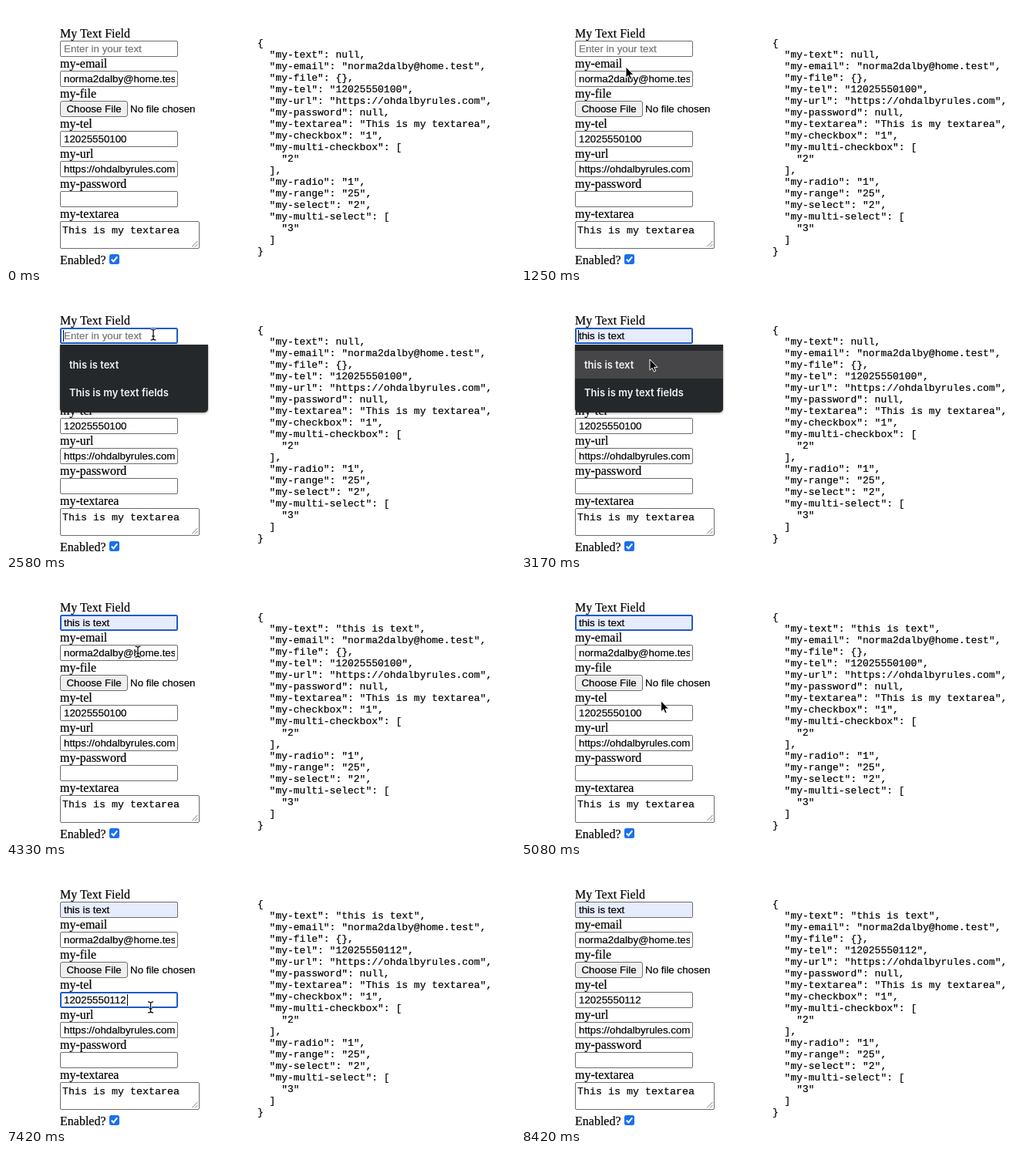
Animation, 660 px wide and 336 px high, one loop 8830 ms. Source, as an HTML page:

```html
<!DOCTYPE html>
<html lang="en">
<head>
<meta charset="utf-8">
<title>Form to JSON</title>
<style>
html, body { margin: 0; width: 100%; height: 100%; overflow: hidden; background: #fff; }
#stage { position: relative; width: 660px; height: 336px; overflow: hidden; color: #000;
  -webkit-text-stroke: .2px; }
#stage > *, .box > * { position: absolute; box-sizing: border-box; white-space: pre; }
.label { left: 70px; font: 16px/18px "Liberation Serif", "Times New Roman", serif; }
.box { left: 70px; width: 153px; height: 21px; background: #fff; border: 1px solid #6c6c6c; border-radius: 2px; }
.box.focus { border-color: #1c5ac8; box-shadow: inset 0 0 0 1px #1c5ac8; }
.box.filled { background: #e6ecfc; }
.value { left: 4px; right: 3px; top: 0; height: 19px; overflow: hidden; }
.value, .ui { font: 13.333px/19px "Liberation Sans", Arial, sans-serif; }
.hint { color: #757575; }
.caret { top: 2px; width: 1px; height: 15px; background: #000; }
#choose { left: 70px; top: 123px; width: 88px; height: 21px; text-align: center;
  background: #efefef; border: 1px solid #6c6c6c; border-radius: 3px; }
#nofile { left: 161px; top: 124px; }
.mono { font-family: "Liberation Mono", "Courier New", monospace; }
#area { top: 279px; width: 181px; height: 36px; }
#area span { left: 2px; top: 4px; font-size: 13.333px; line-height: 15px; }
#area svg { right: 1px; bottom: 1px; }
#json { left: 326px; top: 41px; margin: 0; font-size: 13px; line-height: 15px; }
#check { left: 134px; top: 322px; }
#popup { left: 70px; top: 67px; width: 192px; height: 88px; padding-top: 8px; background: #25282a;
  border-radius: 0 0 5px 5px; box-shadow: 0 1px 3px rgba(0,0,0,.4); -webkit-text-stroke: 0; }
#popup div { height: 36px; padding-left: 12px; color: #f2f2f2;
  font: 600 13px/36px Inter, "Liberation Sans", sans-serif; }
#popup .hover { background: #464648; }
#pointer { left: 0; top: 0; overflow: visible; }
</style>
</head>
<body>
<div id="stage">
  <div class="ui" id="choose">Choose File</div>
  <div class="ui" id="nofile">No file chosen</div>
  <div class="box" id="area"><span class="mono">This is my textarea</span>
    <svg width="8" height="8"><path d="M0 7.5L7.5 0M4 7.5L7.5 4" stroke="#777"/></svg></div>
  <svg id="check" width="13" height="13">
    <rect width="13" height="13" rx="2.5" fill="#1a70ee"/>
    <path d="M2.8 6.8L5.4 9.4L10.2 3.4" fill="none" stroke="#fff" stroke-width="2"/>
  </svg>
  <pre class="mono" id="json"></pre>
  <div id="popup"><div>this is text</div><div>This is my text fields</div></div>
  <svg id="pointer" width="1" height="1">
    <path id="arrow" d="M0 0V14.2L3.2 11.2L5.4 16.2L7.7 15.2L5.6 10.3H10Z" fill="#000" stroke="#fff"/>
    <g id="beam" fill="none">
      <path d="M-3.5 -7Q0 -7 0 -5Q0 -7 3.5 -7M0 -5V5M-3.5 7Q0 7 0 5Q0 7 3.5 7M-2 2H2" stroke="#fff" stroke-width="2.6"/>
      <path d="M-3.5 -7Q0 -7 0 -5Q0 -7 3.5 -7M0 -5V5M-3.5 7Q0 7 0 5Q0 7 3.5 7M-2 2H2" stroke="#000" stroke-width="1.2"/>
    </g>
  </svg>
</div>
<script>
const LOOP = 8830, TICK = 1000 / 12;
const EMAIL = "norma2dalby@home.test", URL_TEXT = "https://ohdalbyrules.com";
const $ = id => document.getElementById(id);
const stage = $("stage"), json = $("json"), popup = $("popup");

// Pointer hot spot: time, x, y
const path = [
  [580, 208, 338], [1250, 136, 79], [1420, 135, 78], [1500, 135, 78], [2170, 191, 54],
  [2750, 191, 54], [3170, 167, 86], [3750, 167, 86], [4330, 171, 93], [4670, 178, 128],
  [5420, 184, 177], [7340, 184, 177], [8000, 268, 295], [8420, 268, 295]
];
// Telephone value after each edit
const edits = [
  [0, "12025550100"], [6420, "1202555010"], [6670, "120255501"],
  [6830, "1202555011"], [7080, "12025550112"]
];
const caretResets = [2500, 3000, 3500, 5500, 6420, 6670, 6830, 7080];

function add(tag, className, parent, text = "") {
  const el = document.createElement(tag);
  el.className = className;
  el.textContent = text;
  parent.prepend(el);
  return el;
}

function label(text, top) {
  add("div", "label", stage, text).style.top = top + "px";
}

function field(top, text = "") {
  const box = add("div", "box", stage);
  box.style.top = top + "px";
  const caret = add("i", "caret", box);
  const value = add("span", "value", box, text);
  caret.style.display = "none";
  return { box, value, caret };
}

["My Text Field", "my-email", "my-file", "my-tel", "my-url", "my-password", "my-textarea"]
  .forEach((name, i) => label(name, 27 + 39 * i));
label("Enabled?", 321);
const text = field(45), tel = field(162);
field(84, EMAIL);
field(201, URL_TEXT);
field(240);

const latest = (list, t) => list.filter(item => item[0] <= t).pop();
const inBox = (x, y, top, h = 21) => x >= 70 && x <= 223 && y >= top && y <= top + h;

function pointerAt(t) {
  const i = Math.max(1, path.findIndex(p => p[0] >= t));
  const [a, b] = [path[i - 1], path[i]];
  const u = (t - a[0]) / (b[0] - a[0]), k = u * u * (3 - 2 * u);
  return [a[1] + (b[1] - a[1]) * k, a[2] + (b[2] - a[2]) * k];
}

function drawPointer(t, popupOpen) {
  const shown = t >= 580 && t < 8420 && !(t >= 6420 && t < 7420);
  $("pointer").style.display = shown ? "" : "none";
  if (!shown) return;
  const [x, y] = pointerAt(t);
  const overPopup = popupOpen && y > 67;
  const beam = !overPopup &&
    ([45, 84, 162, 201, 240].some(top => inBox(x, y, top)) || inBox(x, y, 279, 36));
  $("beam").style.display = beam ? "" : "none";
  $("arrow").style.display = beam ? "none" : "";
  $("pointer").style.transform = `translate(${x}px, ${y}px)`;
}

function drawField(f, focus, caretOn, caretX) {
  f.box.classList.toggle("focus", focus);
  f.caret.style.display = focus && caretOn ? "" : "none";
  f.caret.style.left = caretX + "px";
}

function data(filled, phone) {
  return {
    "my-text": filled ? "this is text" : null,
    "my-email": EMAIL,
    "my-file": {},
    "my-tel": phone,
    "my-url": URL_TEXT,
    "my-password": null,
    "my-textarea": "This is my textarea",
    "my-checkbox": "1",
    "my-multi-checkbox": ["2"],
    "my-radio": "1",
    "my-range": "25",
    "my-select": "2",
    "my-multi-select": ["3"]
  };
}

function draw(now) {
  const t = Math.floor((now % LOOP + 5) / TICK) * TICK + 5;
  const filled = t >= 3500, preview = t >= 3000;
  const popupOpen = t >= 2580 && t < 3500;
  const phone = latest(edits, t)[1];
  const reset = caretResets.filter(c => c <= t).pop() || 0;
  const caretOn = (t - reset) % 1000 < 505;

  text.value.textContent = preview ? "this is text" : "Enter in your text";
  text.value.classList.toggle("hint", !preview);
  text.box.classList.toggle("filled", preview);
  drawField(text, t >= 2500 && t < 5500, caretOn, filled ? 65 : 3);

  tel.value.textContent = phone;
  drawField(tel, t >= 5500 && t < 8170, caretOn, 4 + phone.length * 7.415);

  popup.style.opacity = popupOpen ? 1 : t >= 3500 && t < 3580 ? 0.5 : 0;
  popup.firstElementChild.classList.toggle("hover", preview);
  json.textContent = JSON.stringify(data(filled, phone), null, 2);
  drawPointer(t, popupOpen);
}

const start = performance.now();
function loop() {
  draw(performance.now() - start);
  requestAnimationFrame(loop);
}
loop();
</script>
</body>
</html>
```
